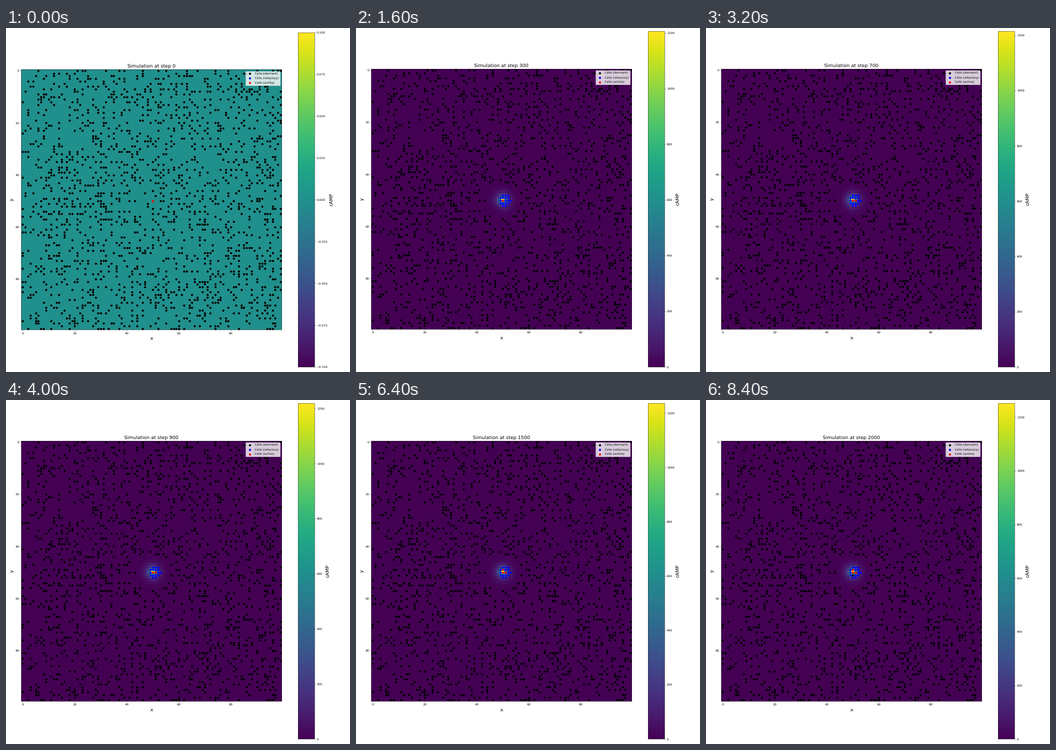
Animation of 748x748 px, one loop 8.8 s. Source, as a matplotlib script:

```python
import numpy as np
import matplotlib.pyplot as plt
from matplotlib.animation import FuncAnimation

STAGE = 748
N = 100
FRAMES = 22
CORE = np.array([50, 50])

plt.rcParams["text.hinting"] = "none"

rng = np.random.default_rng(7)
yy, xx = np.mgrid[:N, :N]
dist = np.hypot(xx - CORE[0], yy - CORE[1])
halo = np.exp(-dist / 1.2)


def cells_where(mask):
    rows, cols = np.nonzero(mask)
    return np.column_stack([cols, rows])


# Scattered cells stay put; a round cluster gathers at the core.
field_cells = cells_where((rng.random((N, N)) < 0.17) & (dist > 6.5))
cluster = cells_where((np.hypot(xx - 50.7, yy - 49.8) < 2.32) & (dist > 0))
spread = 2.4 * (cluster - CORE) + rng.uniform(-1.2, 1.2, cluster.shape)


def step_of(i):
    return i if i < 2 else 100 * (i - 1)


def concentration(i):
    if i == 0:
        return np.zeros((N, N))
    peak = np.interp(i, [1, 2, 4, 12, 21], [469, 1196, 1206, 1223.5, 1252.3])
    return peak * (halo if i > 1 else dist == 0)


def gathered(i):
    """Near cells on the grid, pulled in over the first steps."""
    pull = np.interp(i, [1, 2, 3], [0, 0.65, 1])
    return np.rint(CORE + spread + pull * (cluster - CORE - spread)).astype(int)


def cell_groups(i):
    """Positions of the dormant, refractory and active cells."""
    near = gathered(i)
    if i < 2:
        return np.vstack([field_cells, near]), np.empty((0, 2)), [CORE]
    active = {(50, 50)}
    if i >= 7:
        active.add((51, 50))
    if i >= 14:
        active.add((50, 49))
    resting = {(50, 51)} if i > 16 and i % 2 else set()
    refractory = {(int(x), int(y)) for x, y in near} - active - resting
    return (np.vstack([field_cells, *resting]), sorted(refractory),
            sorted(active))


fig, ax = plt.subplots(figsize=(16, 16), dpi=STAGE / 16)
im = ax.imshow(np.zeros((N, N)), cmap="viridis", vmin=-0.1, vmax=0.1)
dots = [ax.scatter([], [], color=color, label=f"Cells ({name})")
        for color, name in (("black", "dormant"), ("blue", "refactory"),
                            ("red", "active"))]
ax.set(xlim=(-0.5, N - 0.5), ylim=(N - 0.5, -0.5))
ax.set_xlabel("x", fontsize=16, labelpad=5.5)
ax.set_ylabel("y", fontsize=16)
ax.legend(loc="upper right", labelspacing=0.65)
title = ax.set_title("", fontsize=16)
bar = fig.colorbar(im, ax=ax)
bar.set_label("cAMP", fontsize=16)


def place(top, bottom):
    fig.subplots_adjust(left=33.4 / STAGE, right=741 / STAGE,
                        top=1 - top / STAGE, bottom=1 - bottom / STAGE)


def update(i):
    data = concentration(i)
    im.set_data(data)
    if i == 0:
        im.set_clim(-0.1, 0.1)
        place(9.6, 737.1)
    else:
        im.set_clim(0, data.max())
        place(7, 737.2)
    for dot, cells in zip(dots, cell_groups(i)):
        dot.set_offsets(cells)
    title.set_text(f"Simulation at step {step_of(i)}")
    return [im, title, *dots]


anim = FuncAnimation(fig, update, frames=FRAMES, interval=400, repeat=True,
                     repeat_delay=0, blit=False)
plt.show()
```
